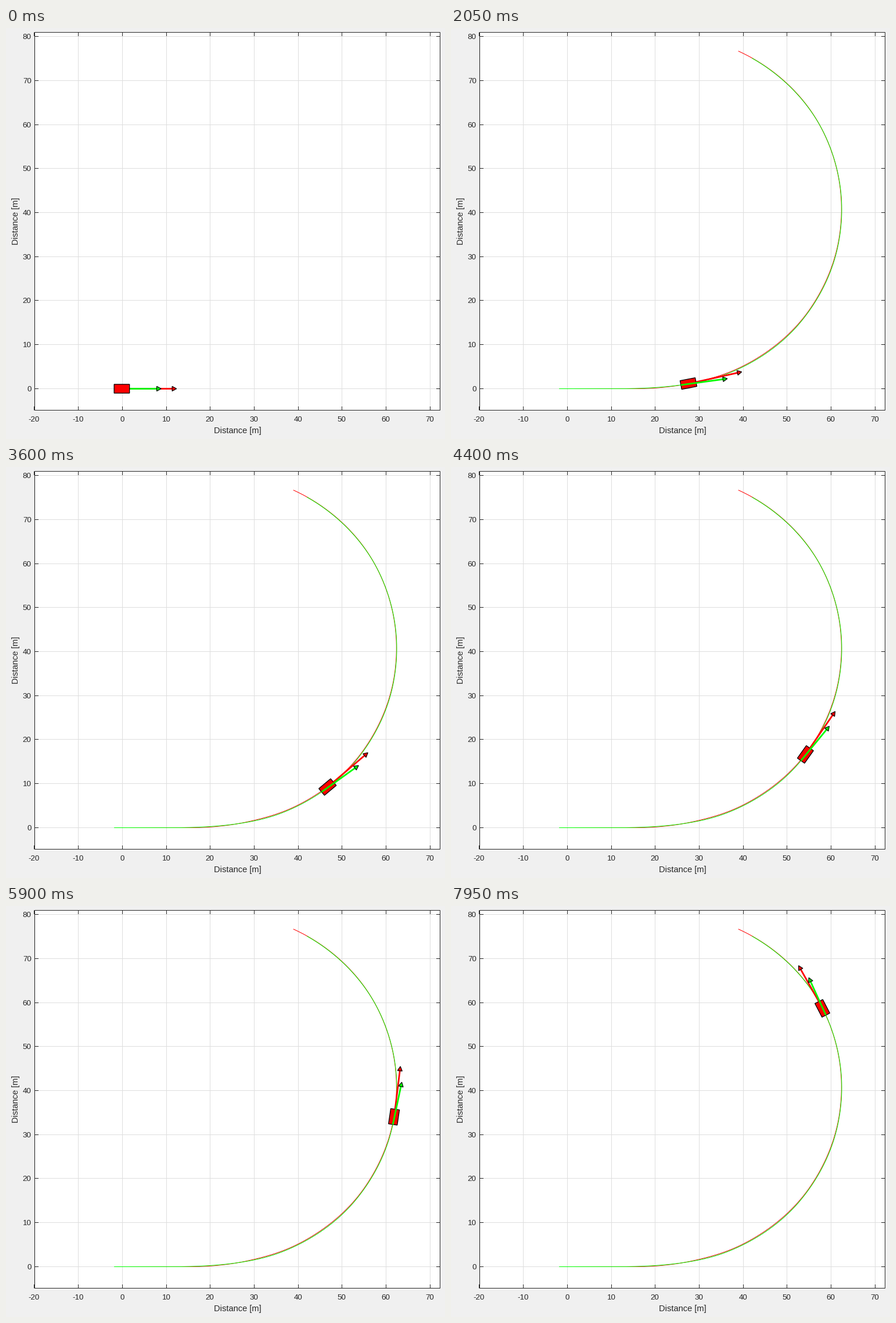
Animation, 756 px wide and 707 px high, one loop 8 s. Source, as a matplotlib script:

```python
import numpy as np
import matplotlib.pyplot as plt
from matplotlib.animation import FuncAnimation
from matplotlib.patches import Polygon, Rectangle

W, H, DPI = 756, 707, 100
FRAMES, STEP_MS = 160, 50
PX = 72 / DPI                      # points per pixel
LEFT, RIGHT, TOP, BOTTOM = 49.5, 747.5, 7.5, 657.5
SCALE, X0, Y0 = 7.571, 200.4, 620.4
CAR_L, CAR_W = 26.5, 15.15
ARROW = 15.47                      # arrow pixels per unit of speed
INK, RED, GREEN = "#262626", "#ff0000", "#00ff00"

plt.rcParams["font.family"] = "Liberation Sans"
plt.rcParams["path.snap"] = False  # coordinates already sit on pixel centres

# Motion of the car: time step, rear end of the car in stage pixels
KNOTS = np.array([
    (1, 186.2, 620.5), (19, 280.4, 620.5), (41, 395.9, 614.1),
    (57, 476.0, 594.7), (88, 602.7, 505.2), (118, 666.2, 375.8),
    (136, 672.1, 290.8), (159, 645.6, 187.8), (201, 518.3, 51.9)])


def speed(k):
    return 5.235 - 0.0054 * np.maximum(0, k - 38)


def heading(k):
    ramp = np.clip(k - 20.5, 0, 17.5)
    t = np.maximum(0, k - 38)
    return np.radians(0.0264 * ramp**2 + 0.95 * t - 0.00039 * t**2)


def slip(k):
    return np.radians(np.interp(k, [18, 52, 159, 201], [0, 4.7, 2.8, 1.9]))


def unit(a):
    """Direction on the stage, where y points down."""
    return np.stack([np.cos(a), -np.sin(a)], axis=-1)


def rear_velocity(k):
    return np.asarray(speed(k))[..., None] * unit(heading(k) - slip(k))


def front_velocity(k):
    turn = heading(k + 0.5) - heading(k - 0.5)
    side = unit(heading(k) + np.pi / 2)
    return rear_velocity(k) + CAR_L * np.asarray(turn)[..., None] * side


def rear(k):
    """Cubic Hermite curve through the knots."""
    times, pts = KNOTS[:, 0], KNOTS[:, 1:]
    i = np.clip(np.searchsorted(times, k, side="right") - 1, 0, len(times) - 2)
    span = (times[i + 1] - times[i])[..., None]
    u = (np.asarray(k) - times[i])[..., None] / span
    m0 = rear_velocity(times[i]) * span
    m1 = rear_velocity(times[i + 1]) * span
    blend = u * u * (3 - 2 * u)
    return (pts[i] * (1 - blend) + pts[i + 1] * blend
            + m0 * u * (1 - u)**2 + m1 * u * u * (u - 1))


def front(k):
    return rear(k) + CAR_L * unit(heading(k))


fig = plt.figure(figsize=(W / DPI, H / DPI), dpi=DPI, facecolor="#f0f0f0")
ax = fig.add_axes([0, 0, 1, 1])
ax.set_xlim(0, W)
ax.set_ylim(H, 0)
ax.axis("off")


def line(xs, ys, color, width=1, z=2):
    return ax.plot(xs, ys, color=color, lw=width * PX, zorder=z,
                   solid_capstyle="butt")[0]


def label(x, y, text, px, **kw):
    ax.text(x, y, text, fontsize=px * PX, color=INK, va="baseline", **kw)


def draw_axes():
    size = (RIGHT - LEFT, BOTTOM - TOP)
    ax.add_patch(Rectangle((LEFT, TOP), *size, fc="white", ec="none", zorder=0))
    for v in range(-20, 71, 10):
        x = np.floor(X0 + SCALE * v) + 0.5
        line([x, x], [TOP, BOTTOM], "#dedede", z=1)
        line([x, x], [BOTTOM, BOTTOM - 6.5], INK)
        line([x, x], [TOP, TOP + 6.5], INK)
        label(x - 0.5, 677.3, str(v), 13.33, ha="center")
    for v in range(0, 81, 10):
        y = np.floor(Y0 - SCALE * v) + 0.5
        line([LEFT, RIGHT], [y, y], "#dedede", z=1)
        line([LEFT, LEFT + 6.5], [y, y], INK)
        line([RIGHT, RIGHT - 6.5], [y, y], INK)
        label(43.6, y + 4.6, str(v), 13.33, ha="right")
    ax.add_patch(Rectangle((LEFT, TOP), *size, fc="none", ec=INK, lw=PX, zorder=3))
    label(398.7, 697, "Distance [m]", 14.67, ha="center")
    label(21, 332.5, "Distance [m]", 14.67, ha="center",
          rotation=90, rotation_mode="anchor")


class Arrow:
    HEAD, HALF = 7.6, 4.1

    def __init__(self, color, z):
        self.shaft = line([], [], color, 2.8, z)
        self.head = Polygon(np.zeros((3, 2)), fc=color, ec="black",
                            lw=1.2 * PX, zorder=z + 0.1)
        ax.add_patch(self.head)

    def place(self, start, vector):
        tip = start + vector
        d = vector / np.hypot(*vector)
        n = np.array([-d[1], d[0]]) * self.HALF
        base = tip - d * self.HEAD
        self.shaft.set_data(*np.stack([start, base], axis=1))
        self.head.set_xy([tip, base + n, base - n])


draw_axes()
steps = np.arange(1, 201.01, 0.5)
paths = [line(*front(steps).T, RED, 1, 4), line(*rear(steps).T, GREEN, 1, 5)]
car = Polygon(np.zeros((4, 2)), fc=RED, ec="black", lw=1.3 * PX)
ax.add_patch(car)
red_arrow, green_arrow = Arrow(RED, 7), Arrow(GREEN, 8)


def update(frame):
    started = frame > 0
    k = np.float64(max(frame, 1))
    back, nose = rear(k), front(k)
    side = unit(heading(k) + np.pi / 2) * CAR_W / 2
    car.set_xy([back + side, nose + side, nose - side, back - side])
    # The parked car covers its arrows; once moving, they lie on top
    car.set_zorder(6 if started else 9)
    red_arrow.place(nose, ARROW * front_velocity(k))
    green_arrow.place(back, ARROW * rear_velocity(k))
    for p in paths:
        p.set_visible(started)
    return []


anim = FuncAnimation(fig, update, frames=FRAMES, interval=STEP_MS,
                     init_func=lambda: update(0), repeat=True, repeat_delay=0)
plt.show()
```
